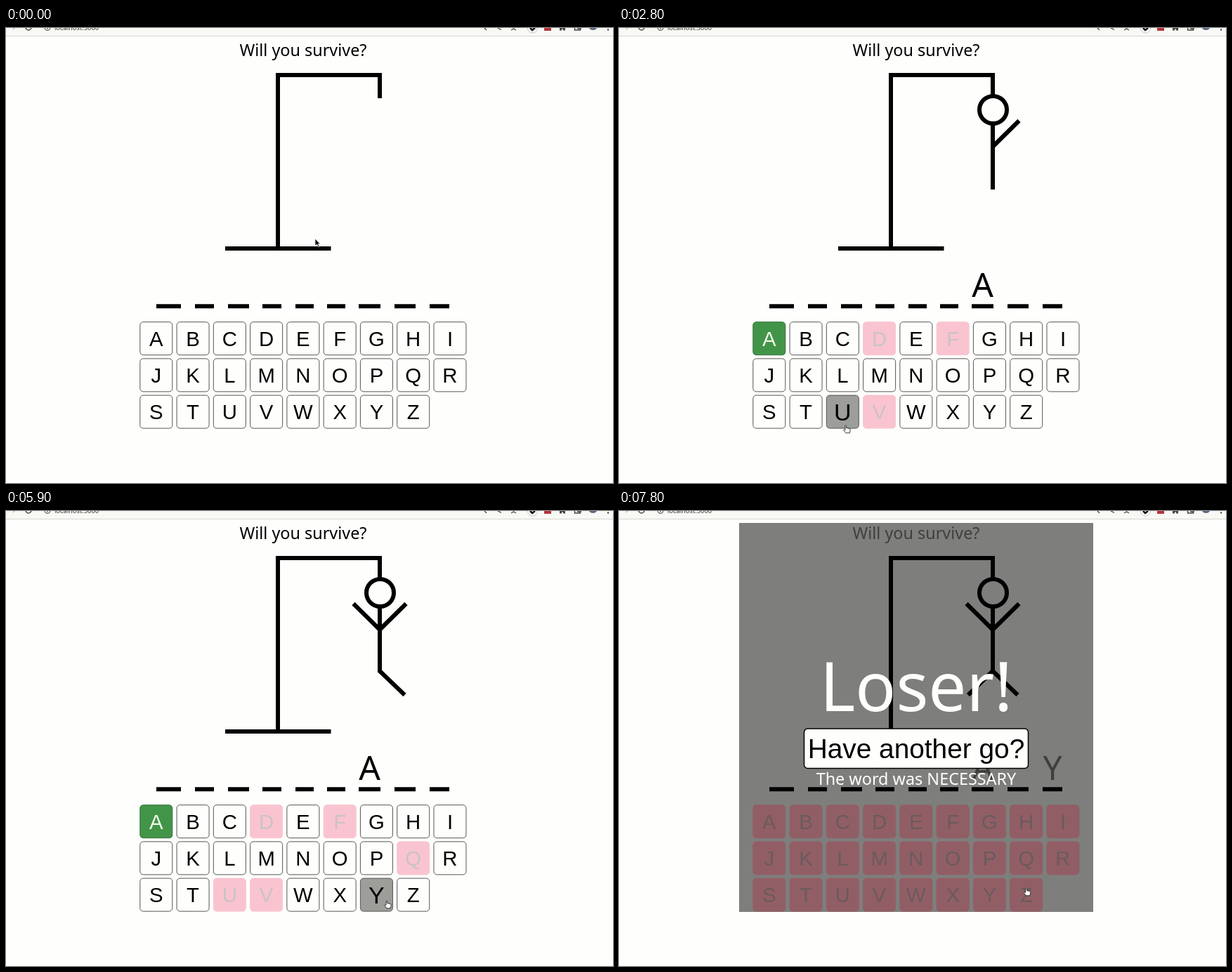
Animation of 864 by 648 pixels, one loop 8 s. Source, as an HTML page:

```html
<!DOCTYPE html>
<html lang="en">
<head>
<meta charset="utf-8">
<title>Hangman</title>
<style>
html, body { margin: 0; width: 100%; height: 100%; overflow: hidden; background: #fefffc; }
svg { display: block; width: 864px; height: 648px; }
text { font-family: "Noto Sans", sans-serif; text-anchor: middle; }
.line { fill: none; stroke: #000; stroke-width: 6; }
.key text, .go { font-family: "Liberation Sans", Arial, sans-serif; }
.key text { font-size: 29.3px; }
.key rect { fill: #fefffc; stroke: #555; }
.hover rect { fill: #9d9e99; }
.hover text { font-size: 34px; }
.right rect { fill: #429548; stroke: #356f3b; }
.right text { fill: #f4f9ea; }
.wrong rect { fill: #f9c4cf; stroke: #f9c4cf; }
.wrong text { fill: #c9c3c6; }
.over rect { fill: #925e66; stroke: #925e66; }
.over text { fill: #6a5b5d; }
</style>
</head>
<body>
<svg viewBox="0 0 864 648">
  <g id="toolbar" fill="none" stroke="#444" stroke-width="1.5">
    <path d="M0 0H864V11H0Z" fill="#f8f8f5" stroke="none"/>
    <path d="M0 11.5H864" stroke="#d6d6d3" stroke-width="1"/>
    <path d="M10 2L13 -1" stroke="#bbb"/>
    <path d="M28 -1a4 4 0 0 0 8 0"/>
    <circle cx="59" cy="-.5" r="4" stroke-width="1"/><path d="M59 -1v3" stroke-width="1"/>
    <text x="100.5" y="2.5" font-size="9.3" fill="#333" stroke="none">localhost:3000</text>
    <path d="M681 0l3 3M700 0l5 2.5M719 3l3.500-2 3.500 2" stroke-width="1.3"/>
    <circle cx="749.500" cy="0" r="7" fill="#fff" stroke="#c4c4c4" stroke-width="1"/>
    <path d="M746 0l3 3 4-3" stroke="#111" stroke-width="2.500"/>
    <path d="M766 0h10v4h-10z" fill="#b8333c" stroke="none"/>
    <path d="M788 0h8v3.500h-3v-2h-2v2h-3z" fill="#444" stroke="none"/>
    <path d="M809.500 -2h8v5h-8zM814 -2h4v3h-4z"/>
    <path d="M830 0h11a6 5 0 0 1 -11 0z" fill="#566a86" stroke="none"/>
    <circle cx="857" cy="2.500" r="1.200" fill="#444" stroke="none"/>
  </g>
  <text id="title" x="423" y="40" font-size="23.4">Will you survive?</text>
  <g id="letters" font-size="48">
    <text x="517.5" y="383">A</text>
    <text x="617" y="383">Y</text>
  </g>
  <path id="shade" d="M171 17H675V571H171Z" fill="#000" opacity=".5"/>
  <path class="line" d="M312 314H462.500M387 314V67H532V100"/>
  <path class="line" d="M214 396.300h35m20 0h27m20 0h30m19 0h27m20 0h26m19 0h26m19 0h31m20 0h30m20 0h28"/>
  <g id="man" class="line">
    <circle cx="532.5" cy="116.500" r="19.500"/>
    <path d="M532 138V230"/>
    <path d="M532 169L569.500 132"/>
    <path d="M532 169L494.500 132"/>
    <path d="M531 227L567.500 262"/>
    <path d="M533 227L497 262"/>
  </g>
  <g id="keys"></g>
  <g id="modal">
    <text x="423" y="285" font-size="96" fill="#fefffc">Loser!</text>
    <rect x="263.500" y="310" width="319" height="56.500" rx="5" fill="#fefffc" stroke="#000" stroke-width="1.500"/>
    <text class="go" x="423" y="352" font-size="38.8">Have another go?</text>
    <text x="423" y="390" font-size="23.4" fill="#fefffc">The word was NECESSARY</text>
  </g>
  <path id="arrow" d="M0 0V10L2.500 8L4.500 12L6 11.200L4.200 7.500H7Z" fill="#111" stroke="#fff" stroke-width=".6"/>
  <path id="hand" d="M3.500 7V1.500Q4.300 0 5.200 1.500V4.500L9.500 5.500Q11 6 10.700 8L9.800 11.800H4.500L1 7.500Q1.500 6 3.500 7.500Z" fill="#fff" stroke="#222" stroke-width=".9"/>
</svg>
<script>
const $ = id => document.getElementById(id);
const LOOP = 8000, END = 7800;
const right = { A: 700, Y: 6500 };
const wrong = { D: 1100, F: 1300, V: 2100, U: 3100, Q: 5000, Z: END };

// time, pointer x, pointer y, key under the pointer
const path = [
  [0, 440, 300], [300, 459, 349], [700, 365, 446, "D"],
  [1100, 418, 446, "E"], [1200, 465, 446, "F"], [1300, 460, 449],
  [1400, 398, 459, "E"], [1500, 390, 476, "M"], [1600, 382, 500, "M"],
  [1700, 373, 526, "V"], [1800, 363, 548, "V"],
  [2500, 350, 557], [2600, 335, 562, "U"], [2700, 325, 564, "U"], [2800, 318.5, 565, "U"],
  [3500, 350, 552], [3600, 405, 528, "W"], [3700, 440, 508, "N"], [3800, 468, 493, "O"],
  [4100, 488, 492, "O"], [4200, 530.5, 491, "P"], [4300, 555, 490, "Q"], [4400, 572, 488, "Q"],
  [5100, 574, 488], [5600, 573, 503], [5700, 566, 528, "Z"], [5800, 546, 548, "Y"],
  [5900, 537.5, 554, "Y"], [6100, 539, 555], [6200, 539, 554, "Y"],
  [6800, 556, 546, "Z"], [6900, 572, 540, "Z"], [7700, 575, 536, "Z"]
];

const keys = [..."ABCDEFGHIJKLMNOPQRSTUVWXYZ"].map((name, i) => {
  const x = 190.8 + i % 9 * 52.27, y = 418.7 + Math.floor(i / 9) * 52.2;
  $("keys").insertAdjacentHTML("beforeend",
    `<g><rect x="${x}" y="${y}" width="46" height="47" rx="4.5"/><text x="${x + 23}">${name}</text></g>`);
  const el = $("keys").lastChild;
  return { name, el, label: el.lastChild, mid: y + 23.7 };
});

const show = (el, on) => el.style.display = on ? "" : "none";

function draw(t) {
  const over = t >= END;
  const [, x, y, under] = path.findLast(p => p[0] <= t);

  for (const k of keys) {
    const state = over ? "over" : t >= right[k.name] ? "right"
      : t >= wrong[k.name] ? "wrong" : k.name === under ? "hover" : "";
    k.el.setAttribute("class", "key " + state);
    k.label.setAttribute("y", k.mid + (state === "hover" ? 12.2 : 10.5));
  }
  Object.values(wrong).forEach((at, i) => show($("man").children[i], t >= at));
  Object.values(right).forEach((at, i) => show($("letters").children[i], t >= at));

  $("title").style.opacity = $("letters").style.opacity = over ? .5 : 1;
  show($("shade"), over);
  show($("modal"), over);

  const onPage = t < 700;
  show($("arrow"), onPage);
  show($("hand"), !onPage);
  $(onPage ? "arrow" : "hand").setAttribute("transform", `translate(${x} ${y})`);
}

const start = performance.now();
function tick() {
  draw((performance.now() - start) % LOOP);
  requestAnimationFrame(tick);
}
tick();
</script>
</body>
</html>
```
